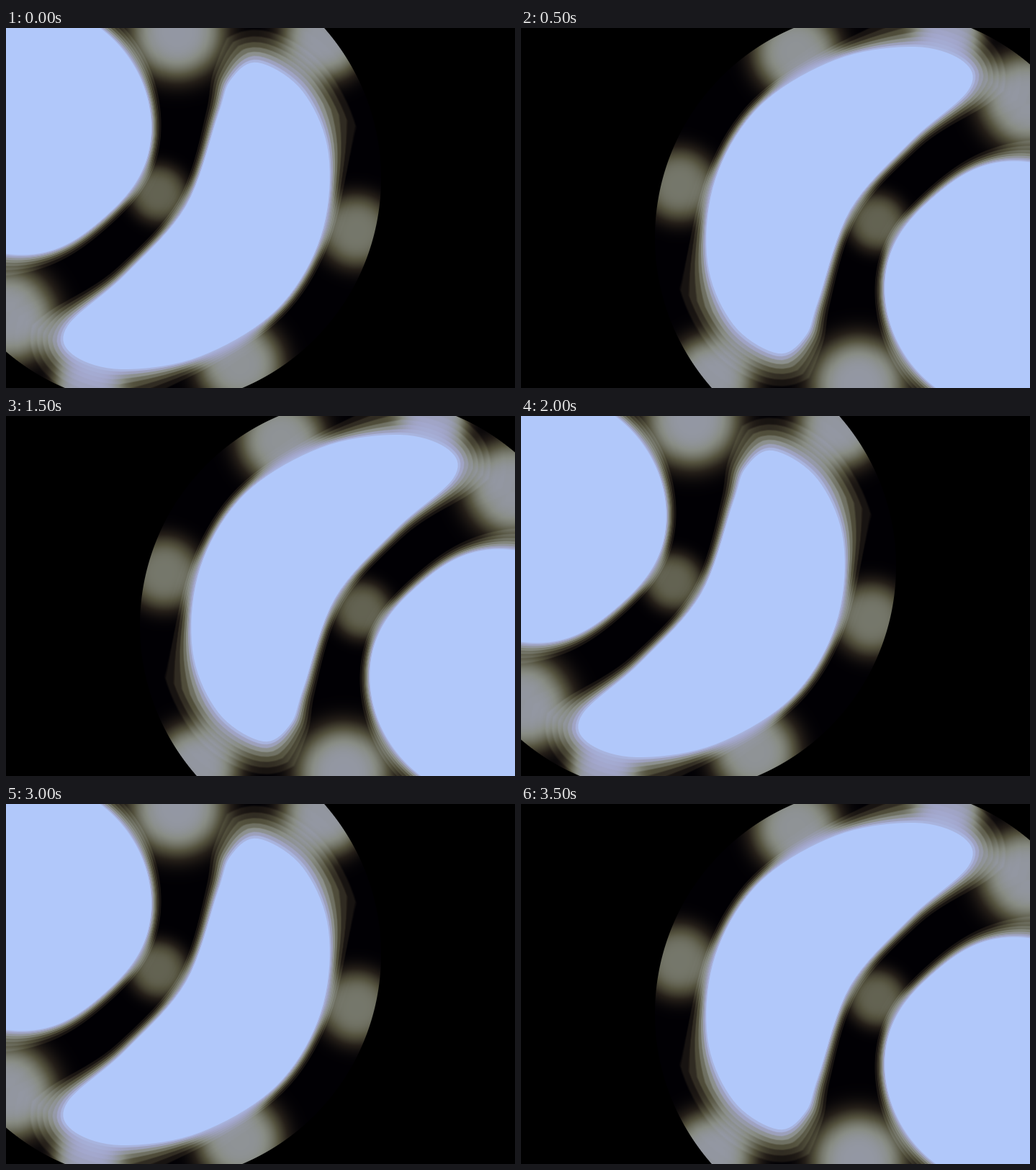
Recreate the animation shown at these times as an HTML page with a canvas. Size 707x500 px, loop 4 s.

```html
<!DOCTYPE html>
<html>
<head>
<meta charset="utf-8">
<style>
html, body { margin: 0; width: 707px; height: 500px; overflow: hidden; background: #000; }
canvas { display: block; animation: flip 1s step-end infinite; }
@keyframes flip {
  0% { transform: none; }
  50%, 100% { transform: rotate(180deg); }
}
</style>
</head>
<body>
<canvas id="stage" width="707" height="500"></canvas>
<script>
const W = 707, H = 500;
const disk = { x: 204.5, y: 208.5, r: 316 };
const ball = { x: 27, y: 141, r: 175 };
const axis = { x: 215, y: 243, c: Math.cos(.6), s: Math.sin(.6) };

// Key points of the bean, clockwise from its upper tip
const bean = outline([
  [350, 48], [412, 88], [448, 175], [437, 290], [376, 391], [270, 456], [160, 474],
  [92, 453], [86, 413], [165, 343], [250, 247], [294, 122], [312, 72]
]);

// Soft glows: x, y, radius, brightness
const glows = [
  [238, 5, 70, .78], [443, 12, 64, .76], [487, 282, 54, .6], [325, 467, 64, .74],
  [112, 502, 50, .76], [4, 400, 70, .76], [212, 230, 42, .52]
];

const ramp = [[1, 0, 4], [36, 30, 24], [84, 82, 62], [136, 140, 132], [162, 166, 203], [177, 200, 250]];

const clamp = v => Math.max(0, Math.min(1, v));

// Closed Catmull-Rom spline as short segments
function outline(keys, steps = 9) {
  const n = keys.length, pts = [];
  keys.forEach((b, i) => {
    const a = keys[(i + n - 1) % n], c = keys[(i + 1) % n], d = keys[(i + 2) % n];
    for (let t = 0; t < .999; t += 1 / steps) {
      pts.push([0, 1].map(k => b[k] + t / 2 * (c[k] - a[k] +
        t * (2 * a[k] - 5 * b[k] + 4 * c[k] - d[k] + t * (3 * (b[k] - c[k]) + d[k] - a[k])))));
    }
  });
  return pts.map(([x, y], i) => {
    const [x2, y2] = pts[(i + 1) % pts.length], dx = x2 - x, dy = y2 - y;
    return { x, y, y2, dx, dy, inv: 1 / (dx * dx + dy * dy) };
  });
}

// Signed distances, negative inside
function beanDistance(px, py) {
  let best = Infinity, inside = false;
  for (const e of bean) {
    const ax = px - e.x, ay = py - e.y;
    const t = clamp((ax * e.dx + ay * e.dy) * e.inv);
    const qx = ax - t * e.dx, qy = ay - t * e.dy;
    best = Math.min(best, qx * qx + qy * qy);
    if ((e.y > py) !== (e.y2 > py) && ax < e.dx * ay / e.dy) inside = !inside;
  }
  return Math.sqrt(best) * (inside ? -1 : 1);
}

// The ball is a little flattened where it faces the bean
function ballDistance(x, y) {
  const dx = x - ball.x, dy = y - ball.y;
  const turn = (Math.atan2(dy, dx) - .85) / .45;
  return Math.hypot(dx, dy) - ball.r + 11 * Math.exp(-turn * turn);
}

function level(x, y) {
  const d = Math.min(ballDistance(x, y), beanDistance(x, y));
  if (d < -.5) return 1;

  let dark = 1;
  for (const [gx, gy, r, lum] of glows) {
    const q = ((x - gx) ** 2 + (y - gy) ** 2) / (r * r);
    dark *= 1 - lum * Math.exp(-q * q);
  }

  // Rings spread with the distance and towards the tips of the bean
  const off = (x - axis.x) * axis.s - (y - axis.y) * axis.c;
  const wide = 11 * (1 + 2 * Math.min(1.2, (off / 230) ** 4));
  const k = 6 * Math.log2(1 + Math.max(0, d) / wide);
  const ring = Math.floor(k) + clamp((k % 1 - .7) / .3);

  const base = (1 - dark) * (1 - .012 * Math.min(ring, 10));
  const v = base + Math.max(0, .88 - base) * clamp(1 - ring / 7);
  return v + (1 - v) * clamp(.5 - d);
}

function shade(v) {
  const p = clamp(v) * (ramp.length - 1), i = Math.min(Math.floor(p), ramp.length - 2);
  return ramp[i].map((a, k) => a + (ramp[i + 1][k] - a) * (p - i));
}

function paint() {
  const ctx = document.getElementById('stage').getContext('2d');
  const img = ctx.createImageData(W, H);
  for (let y = 0, p = 0; y < H; y++) {
    for (let x = 0; x < W; x++, p += 4) {
      img.data[p + 3] = 255;
      const cover = clamp(disk.r - Math.hypot(x - disk.x, y - disk.y) + .5);
      if (!cover) continue;
      shade(level(x + .5, y + .5)).forEach((c, k) => img.data[p + k] = c * cover);
    }
  }
  ctx.putImageData(img, 0, 0);
}

paint();
</script>
</body>
</html>
```
